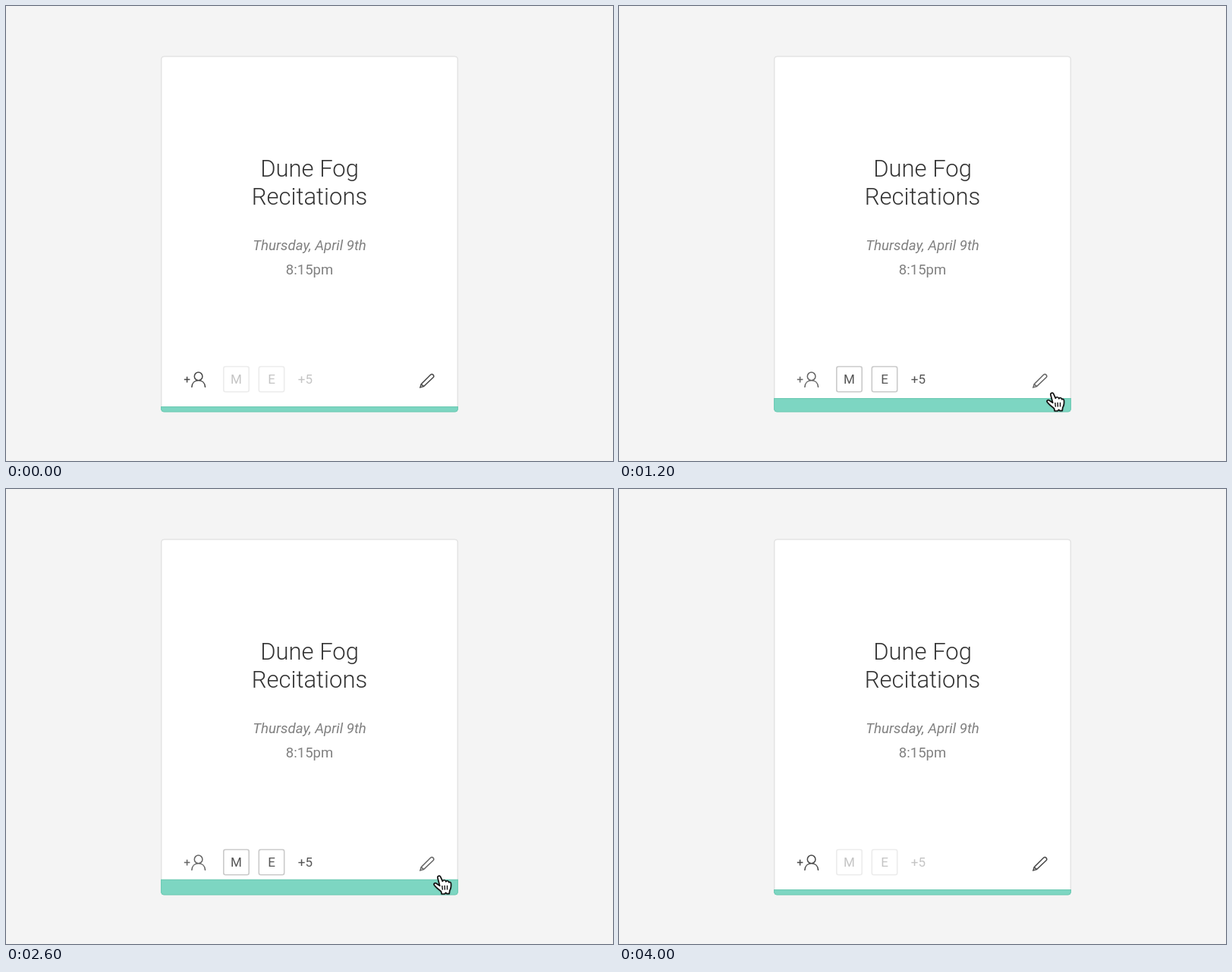
An HTML page with a canvas for the animation above (4.1 s loop, 800 px wide and 600 px high).

```html
<!DOCTYPE html>
<html lang="en">
<head>
<meta charset="utf-8">
<title>Event card</title>
<style>
html, body { margin: 0; width: 100%; height: 100%; overflow: hidden; background: #f4f4f4; }
canvas { display: block; }
</style>
</head>
<body>
<canvas id="stage" width="800" height="600"></canvas>
<script>
const ctx = document.getElementById("stage").getContext("2d");
const LOOP = 4100, STEP = 100;
const GREEN = "#7dd6c2", GREEN_EDGE = "#6fcbb5";

// Keyframes are [time, value] pairs.
const BAR = [[1000, 0], [1100, .015], [1200, .141], [1300, .84], [1400, 1],
  [2300, 1], [2400, .998], [2500, .8], [2600, .17], [2700, .02], [2800, .006], [2900, 0]];
const HOVER = [[300, 0], [400, .08], [500, .28], [600, 1]];
const CURSOR_X = [[100, 146], [200, 112], [300, 42], [400, 4], [500, 1.5], [600, 1], [700, 0]];
const CURSOR_Y = [[100, -290], [200, -222], [300, -78], [400, 5], [500, 1.5], [600, 1], [700, 0]];

const lerp = (a, b, k) => a + (b - a) * k;

function valueAt(keys, t) {
  if (t <= keys[0][0]) return keys[0][1];
  for (let i = 1; i < keys.length; i++) {
    const [t0, v0] = keys[i - 1], [t1, v1] = keys[i];
    if (t <= t1) return lerp(v0, v1, (t - t0) / (t1 - t0));
  }
  return keys[keys.length - 1][1];
}

function gray(v, alpha = 1) {
  v = Math.round(v);
  return `rgba(${v},${v},${v},${alpha})`;
}

function rounded(x, y, w, h, r) {
  ctx.beginPath();
  ctx.roundRect(x, y, w, h, r);
}

function text(str, x, y, font, color, align = "center") {
  ctx.font = `${font} Roboto, sans-serif`;
  ctx.textAlign = align;
  ctx.fillStyle = color;
  ctx.fillText(str, x, y);
}

function strokePath(d, color, width = 1.5) {
  ctx.strokeStyle = color;
  ctx.lineWidth = width;
  ctx.stroke(new Path2D(d));
}

const ICONS = {
  person: "M234.8 492.6H242.4M238.6 488.8V496.4" +
    "M258.9 488.4A5.3 5.3 0 1 1 248.3 488.4A5.3 5.3 0 1 1 258.9 488.4" +
    "M244.8 503C245 497.3 248.5 493.8 253.7 493.8S262.4 497.3 262.6 503",
  pencil: "M545.9 502.9L547.2 498.7L559.6 486.3Q561.3 484.8 563 486.4" +
    "Q564.6 488.1 563.1 489.8L550.6 501.6ZM547.2 498.7L550.6 501.6",
  copy: "M348 483.8H362.3V498.8H348ZM348 489H343.2V503.8H357V498.8",
  trash: "M447 486.3H463.5V489.6H447ZM452 486V483.3H458.5V486M449 489.6V502.3H461.5V489.6" +
    "M453.5 493.5V498.3M457 493.5V498.3",
  close: "M546 485.4L562.6 502M562.6 485.4L546 502"
};

function drawCard() {
  ctx.fillStyle = "#f4f4f4";
  ctx.fillRect(0, 0, 800, 600);
  rounded(204.7, 66.4, 390.6, 468.3, 4);
  ctx.fillStyle = "#fff";
  ctx.fill();
  ctx.strokeStyle = "#e3e3e3";
  ctx.lineWidth = 1.5;
  ctx.stroke();
}

function drawDetails(open) {
  const frame = Math.max(0, (open - .25) / .75);
  rounded(290, 178.5, 220, 107.5, 6);
  ctx.strokeStyle = gray(226, frame);
  ctx.lineWidth = 1.8;
  ctx.stroke();
  text("Dune Fog", 400, 224.5, "300 31px", "#333");
  text("Recitations", 400, 261.7, "300 31px", "#333");
  text("Thursday, April 9th", 400, 322.2, "italic 400 18.7px", "#808080");
  text("8:15pm", 400, 353.6, "400 18.5px", "#808080");
}

function drawFooter(hover) {
  const iconColor = gray(lerp(72, 100, hover));
  strokePath(ICONS.person, iconColor);
  strokePath(ICONS.pencil, iconColor);
  const ink = gray(lerp(196, 85, hover));
  ["M", "E"].forEach((letter, i) => {
    const x = 286.8 + i * 46.5;
    rounded(x, 475.5, 33.4, 33.2, 2.5);
    ctx.strokeStyle = gray(lerp(236, 202, hover));
    ctx.lineWidth = 1.6;
    ctx.stroke();
    text(letter, x + 16.7, 498.4, "400 17px", ink);
  });
  text("+5", 384.8, 498.4, "400 17px", ink, "left");
}

function drawBar(open) {
  const top = lerp(528, 450, open);
  ctx.save();
  rounded(204, top, 392, 535.6 - top, [0, 0, 4.5, 4.5]);
  ctx.clip();
  ctx.fillStyle = GREEN;
  ctx.fill();
  ctx.strokeStyle = GREEN_EDGE;
  ctx.lineWidth = 2.4;
  ctx.stroke();
  ctx.globalAlpha = open;
  for (const name of ["person", "copy", "trash", "close"]) strokePath(ICONS[name], "#fff");
  ctx.restore();
}

const HAND = new Path2D("M-.3 3.7C-.8 1.2 2.5 .2 3.6 2.7L6.2 8.3" +
  "C6.8 6.3 9.8 6 10.6 8.8C11.5 7.1 14 7.3 14.6 9.8C15.5 8.8 17.2 9.3 17.3 11.3" +
  "C17.6 15.2 17.4 17.8 15.6 20.4L15 24.7L11.7 24.7L10.4 23.3L8.8 25L5 25L4.4 22" +
  "C2.2 20-.2 18-2.5 15.8L-4.7 13.5C-6.2 11.2-3.6 9.8-1.8 11.2L2.5 14.2Z");

function drawCursor(x, y) {
  ctx.save();
  ctx.translate(x, y);
  ctx.lineJoin = "round";
  ctx.shadowColor = "rgba(0,0,0,.3)";
  ctx.shadowBlur = 2;
  ctx.shadowOffsetY = 1;
  ctx.fillStyle = "#fff";
  ctx.fill(HAND);
  ctx.shadowColor = "transparent";
  ctx.strokeStyle = "#111";
  ctx.lineWidth = 1.7;
  ctx.stroke(HAND);
  strokePath("M5.6 14L6.2 19.6M8.9 13.8L9.2 19.6M12.3 13.8L12.3 19.6", "#111", 1.4);
  ctx.restore();
}

function draw(t) {
  // The cursor leaves along the path it came by.
  const visit = t >= 3500 ? 4000 - t : t;
  const open = valueAt(BAR, t);
  drawCard();
  drawDetails(open);
  drawFooter(valueAt(HOVER, visit));
  drawBar(open);
  if (visit >= 100) drawCursor(569.2 + valueAt(CURSOR_X, visit), 509 + valueAt(CURSOR_Y, visit));
}

const start = performance.now();
function tick() {
  const t = (performance.now() - start) % LOOP;
  draw(Math.floor(t / STEP) * STEP);
  requestAnimationFrame(tick);
}
tick();
</script>
</body>
</html>
```
